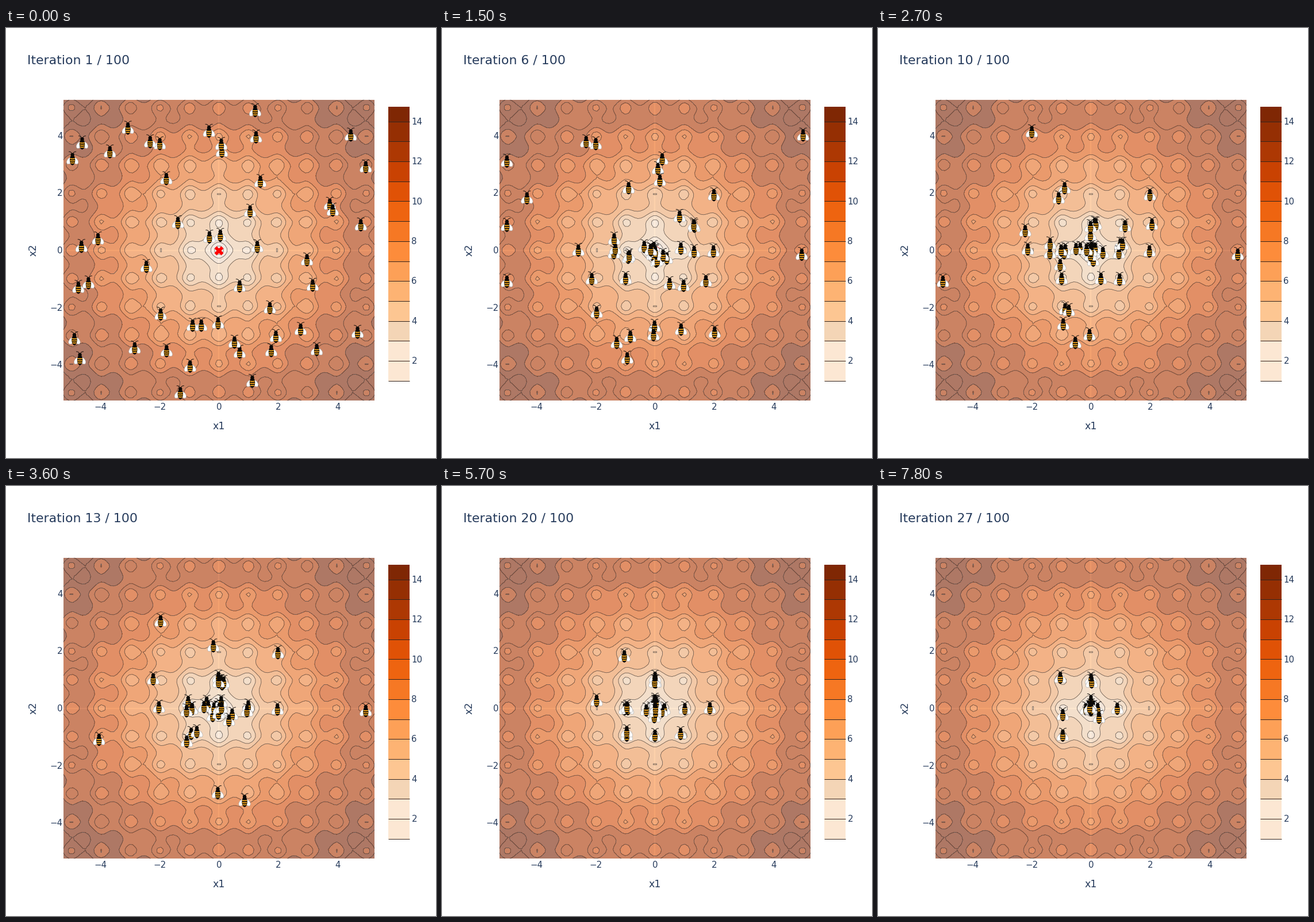
Recreate the animation shown at these times as a matplotlib script. Size 748 px wide and 748 px high, loop 8 s.

```python
import matplotlib.pyplot as plt
import numpy as np
from matplotlib.animation import FuncAnimation
from matplotlib.collections import PathCollection
from matplotlib.patches import Rectangle
from matplotlib.path import Path
from matplotlib.transforms import Affine2D, IdentityTransform

SIZE, DPI = 748, 100
PT = 72 / DPI  # points per pixel
LEFT, TOP, WIDTH, HEIGHT = 100, 125, 541, 523
SPAN = 5.25    # the axes run from -SPAN to SPAN
CENTER = np.array([LEFT + WIDTH / 2, TOP + HEIGHT / 2])
UNIT = np.array([WIDTH, -HEIGHT]) / (2 * SPAN)
INK = "#253a5b"
STEP_MS, TICK_MS, LOOP_MS = 300, 100, 8000
ITERATIONS, BEES, BOUND = 27, 50, 5

plt.rcParams["font.family"] = "DejaVu Sans"
rng = np.random.default_rng(7)

fig = plt.figure(figsize=(SIZE / DPI, SIZE / DPI), dpi=DPI, facecolor="white")
ax = fig.add_axes([0, 0, 1, 1])


def ackley(x, y):
    bowl = -20 * np.exp(-0.2 * np.sqrt((x * x + y * y) / 2))
    ripple = -np.exp((np.cos(2 * np.pi * x) + np.cos(2 * np.pi * y)) / 2)
    return bowl + ripple + 20 + np.e


def to_stage(points):
    return CENTER + UNIT * points


def label(x, y, text, px, **kw):
    kw = {"ha": "center", "va": "baseline", **kw}
    return ax.text(x, y, text, fontsize=px * PT, color=INK, **kw)


def box(x, y, w, h, color, **kw):
    ax.add_patch(Rectangle((x, y), w, h, color=color, lw=0, **kw))


def line(xs, ys, color, px, **kw):
    ax.plot(xs, ys, color=color, lw=px * PT, solid_capstyle="butt", **kw)


def draw_plot():
    box(LEFT, TOP, WIDTH, HEIGHT, "#e5ecf6", zorder=0)
    line([CENTER[0]] * 2, [TOP, TOP + HEIGHT], "white", 2.4, zorder=0.5)
    line([LEFT, LEFT + WIDTH], [CENTER[1]] * 2, "white", 2.4, zorder=0.5)

    grid = np.linspace(-SPAN, SPAN, 100)
    z = ackley(*np.meshgrid(grid, grid))
    xs, ys = to_stage(np.column_stack([grid, grid])).T
    # the darkest bands share their tones in pairs
    tones = np.array([*range(11), 11.5, 11.5, 13.5, 13.5])
    ax.contourf(xs, ys, z, levels=range(16), alpha=0.6, zorder=1,
                colors=plt.cm.Oranges(tones / 14))
    ax.contour(xs, ys, z, levels=range(1, 15), colors="#5c5a5c",
               linewidths=0.75 * PT, zorder=2)

    for v in range(-4, 5, 2):
        name = str(v).replace("-", "\u2212")
        x, y = to_stage(np.array([v, v]))
        label(x, 664.5, name, 15)
        label(98.5, y + 5.6, name, 15, ha="right")
    label(370, 698, "x1", 17.5)
    label(53, 386, "x2", 17.5, rotation=90, rotation_mode="anchor")
    ax.plot(*CENTER, marker="X", ms=16 * PT, mfc="red", mec="none", zorder=3)


def draw_colorbar():
    left, width = 665, 37
    colors = plt.cm.Oranges(np.arange(15) / 14)[:, :3]
    colors[1:3] = np.array([252, 231, 211]) / 255
    colors[3] = np.array([244, 213, 182]) / 255

    def level_y(v):
        return 579 - 34.7 * (v - 2)

    for v in range(1, 15):
        low, high = level_y(v), level_y(min(v + 1, 14.73))
        box(left, high, width, low - high, colors[v])
        line([left, left + width], [low, low], "#33261f", 1)
        if v % 2 == 0:
            label(705.5, low + 5.2, str(v), 15, ha="left")


def ellipse(x, y, w, h, angle=0):
    shape = Affine2D().scale(w / 2, h / 2).rotate_deg(angle).translate(x, y)
    return Path.unit_circle().transformed(shape)


def antenna(side):
    return Path([(side, 8), (side * 2.5, 11.8), (side * 6.5, 11.3)],
                [Path.MOVETO, Path.CURVE3, Path.CURVE3])


def stripe(y, w):
    return Path([(-w, y + 0.9), (0, y + 0.5), (w, y + 0.9),
                 (w, y - 0.9), (0, y - 1.3), (-w, y - 0.9), (-w, y + 0.9)])


def bee_parts():
    """Each part as path, fill, edge, edge width in pixels."""
    black, honey = "#0a0806", "#f9ab1e"
    for side in (-1, 1):
        yield antenna(side), "none", black, 0.9
        yield ellipse(5.2 * side, -4.5, 8, 13, 35 * side), "white", "#a9a9a9", 0.6
    yield ellipse(0, -3.2, 9.4, 18), black, "none", 0
    yield ellipse(0, 5.8, 6.4, 6.6), black, "none", 0
    for y, w in ((-0.8, 4.1), (-4.4, 4.2), (-7.9, 3.4)):
        yield stripe(y, w), honey, "none", 0


def forage(swarm, bee):
    """Try one coordinate relative to another bee; keep it if it is better."""
    axis = rng.integers(2)
    other = (bee + rng.integers(1, BEES)) % BEES
    trial = swarm[bee].copy()
    trial[axis] += rng.uniform(-1, 1) * (trial[axis] - swarm[other, axis])
    trial = trial.clip(-BOUND, BOUND)
    if ackley(*trial) < ackley(*swarm[bee]):
        swarm[bee] = trial


def run_colony():
    """Artificial bee colony search, one swarm per iteration."""
    swarm = rng.uniform(-BOUND, BOUND, (BEES, 2))
    history = [swarm.copy()]
    for _ in range(ITERATIONS - 1):
        for bee in range(BEES):
            forage(swarm, bee)
        fitness = 1 / (1 + ackley(*swarm.T))
        for bee in rng.choice(BEES, BEES, p=fitness / fitness.sum()):
            forage(swarm, bee)
        history.append(swarm.copy())
    return history


draw_plot()
draw_colorbar()
ax.set_xlim(0, SIZE)
ax.set_ylim(SIZE, 0)
ax.axis("off")

title = label(37, 62.5, "", 22, ha="left")
swarms = [to_stage(swarm) for swarm in run_colony()]
paths, fills, edges, widths = zip(*bee_parts())
bees = PathCollection(paths, offsets=np.repeat(swarms[0], len(paths), axis=0),
                      offset_transform=ax.transData, transform=IdentityTransform(),
                      facecolors=fills, edgecolors=edges,
                      linewidths=[w * PT for w in widths], zorder=5)
ax.add_collection(bees, autolim=False)


def update(frame):
    step = frame * TICK_MS // STEP_MS
    title.set_text(f"Iteration {step + 1} / 100")
    bees.set_offsets(np.repeat(swarms[step], len(paths), axis=0))
    return title, bees


anim = FuncAnimation(fig, update, frames=LOOP_MS // TICK_MS, interval=TICK_MS,
                     repeat=True, repeat_delay=0)
plt.show()
```
